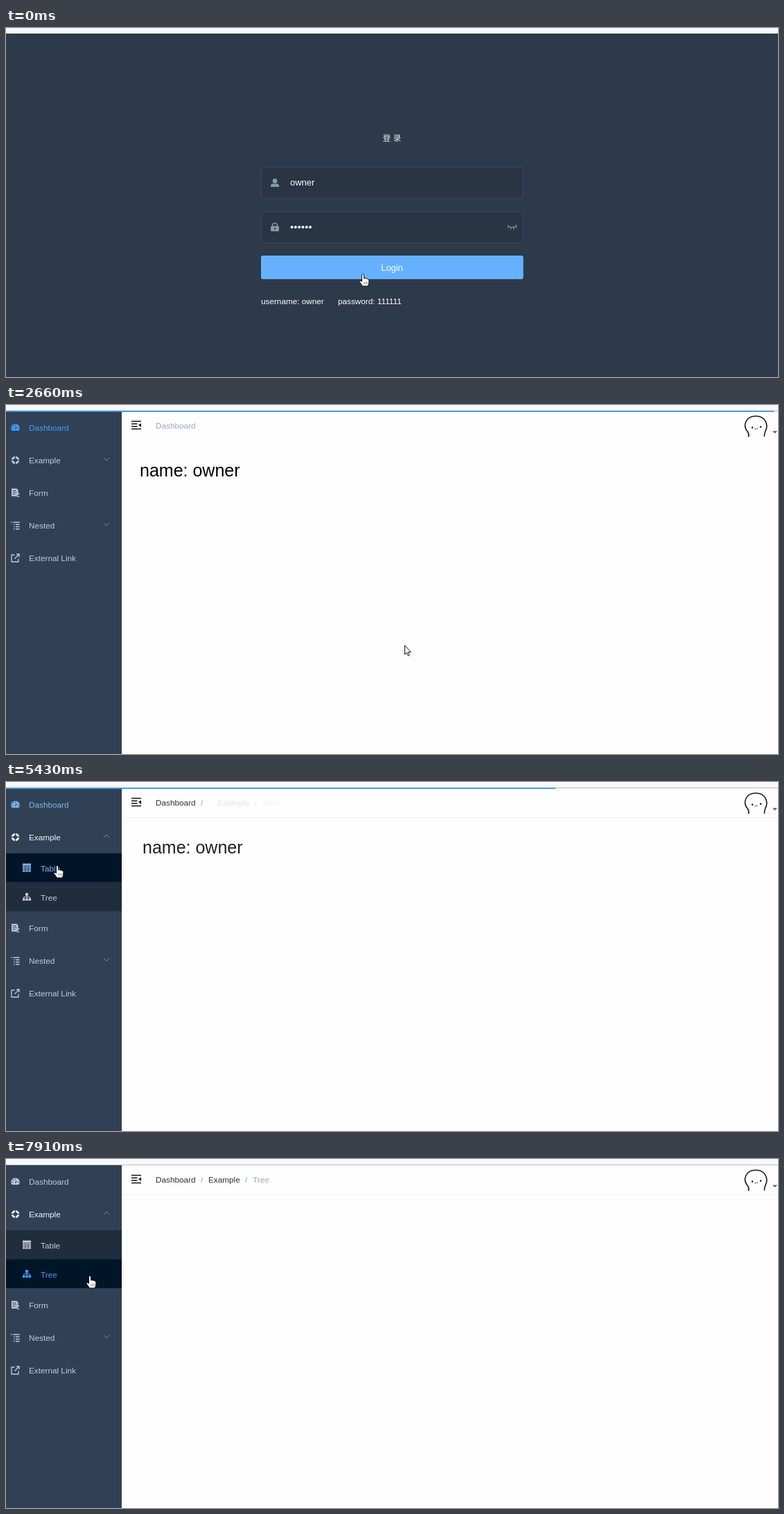
These frames come from a looping animation (1114 px wide and 503 px high, 8000 ms). An HTML page:

```html
<!DOCTYPE html>
<html lang="zh">
<head>
<meta charset="utf-8">
<title>Control panel demo</title>
<style>
html, body { margin: 0; width: 100%; height: 100%; overflow: hidden; background: #fefefe; }
svg { display: block; }
text { font: 11.75px "Liberation Sans", Arial, sans-serif; white-space: pre; }
</style>
</head>
<body>
<svg id="stage" width="100%" height="100%" viewBox="0 0 1114 503"></svg>
<script>
const stage = document.getElementById('stage');
const LOOP = 8000, USER = 'owner', AUTHOR = 'demo-editor';
const BLUE = '#409eff', MENU = '#bfcbd9', CRUMB = '#97a8be';

// Screen updates: [first, last, count]
const times = [[0, 0, 1], [280, 280, 1], [710, 860, 2], [1420, 1960, 5], [2510, 2660, 2],
  [2780, 3470, 6], [3590, 4460, 7], [4770, 4770, 1], [4890, 5430, 4], [5580, 5700, 2],
  [5820, 6750, 8], [7610, 7910, 3]]
  .flatMap(([a, b, n]) => Array.from({ length: n }, (_, i) => n > 1 ? a + (b - a) * i / (n - 1) : a));

// Pointer hot spot: [time, x, y]
const route = [[0, 515, 354], [280, 514, 353], [560, 514, 353], [860, 238, 252], [1285, 238, 252],
  [1960, 577, 346], [2510, 577, 346], [2660, 575, 346], [3470, 838, 134], [4460, 101, 80],
  [4890, 101, 80], [5250, 74, 120], [6600, 74, 120], [6750, 68, 162], [7460, 68, 162], [7910, 121, 168]];

const clamp = v => Math.max(0, Math.min(1, v));
const ease = v => (v = clamp(v), v * v * (3 - 2 * v));
const mix = (a, b, p) => '#' + [1, 3, 5].map(i => {
  const u = parseInt(a.substr(i, 2), 16), v = parseInt(b.substr(i, 2), 16);
  return Math.round(u + (v - u) * p).toString(16).padStart(2, '0');
}).join('');

const rect = (x, y, w, h, fill, more = '') =>
  `<rect x="${x}" y="${y}" width="${w}" height="${h}" fill="${fill}" ${more}/>`;
const line = (d, color, w = 1, more = '') =>
  `<path d="${d}" fill="none" stroke="${color}" stroke-width="${w}" ${more}/>`;
const shape = (d, fill, more = '') => `<path d="${d}" fill="${fill}" ${more}/>`;
const disc = (x, y, r, fill) => `<circle cx="${x}" cy="${y}" r="${r}" fill="${fill}"/>`;
const text = (s, x, y, fill, style = '', anchor = 'start') =>
  `<text x="${x}" y="${y}" fill="${fill}" text-anchor="${anchor}" style="${style}">${s}</text>`;
const mid = (s, x, y, fill, style) => text(s, x, y, fill, style, 'middle');
const group = (body, x, y = 0, opacity = 1, turn = 0) =>
  `<g transform="translate(${x} ${y}) rotate(${turn})" opacity="${opacity}">${body}</g>`;

// Menu icons, centred on 0,0; c is the colour, b the background
const icons = {
  gauge: (c, b) => shape('M-5 4.5A6.2 6.2 0 1 1 5 4.5Z', c) + line('M0 2.5L1.5-1.5', b, 1.2) +
    [[-4, 1], [-2.8, -2], [0, -3.3], [4, 1]].map(([x, y]) => disc(x, y, .8, b)).join(''),
  ring: (c, b) => `<circle r="4.3" fill="none" stroke="${c}" stroke-width="3"/>` +
    line('M0-6.5V-2.5M0 2.5V6.5M-6.5 0H-2.5M2.5 0H6.5', b, 1.3),
  form: (c, b) => shape('M-5.5-6H2L4-4V1L0 5H-5.5Z', c) +
    line('M-4-3H1.5M-4-.5H2M-4 2H0', b) + line('M1 5.5L5.5 .5M3 5.5H5.5', c, 1.3),
  nested: c => line('M-6-4.5H-4.5M-3-4.5H6M-2.5-1.2H-1M.5-1.2H6M-2.5 2H-1M.5 2H6M-2.5 5.2H-1M.5 5.2H6', c, 1.4),
  link: c => line('M-1-4.5H-5.5V5.5H4.5V1M1.5-5.5H5.5V-1.5M5.5-5.5L-1 1', c, 1.3),
  table: (c, b) => rect(-6, -6, 12, 12, c) + line('M-6-2.5H6M-6 .5H6M-6 3.3H6M-2-2.5V6M2-2.5V6', b, .7),
  tree: c => rect(-2, -5.5, 4, 4, c) + [-6, -1.7, 2.6].map(x => rect(x, 2, 3.5, 3.5, c)).join('') +
    line('M0-2V2M-4.3 2V.2H4.3V2', c)
};

function pointer(T) {
  const i = route.findIndex(k => k[0] > T);
  if (i < 0) return route[route.length - 1].slice(1);
  const [a, x, y] = route[i - 1], [b, u, v] = route[i], p = (T - a) / (b - a);
  return [x + (u - x) * p, y + (v - y) * p];
}

function drawPointer(x, y, hand) {
  const d = hand
    ? 'M-1.5 1.5Q0-.8 1.5 1.5V7Q3 5.5 4.3 7.2Q6 6.2 6.9 8Q8.5 7.5 8.8 9.5V13Q8.5 15 7.3 18H-.5Q-2.5 15-5 11.5Q-4.5 9-1.5 11.5Z'
    : 'M.5 .5V13.5L3.3 10.9 5.4 15.5 7.3 14.6 5.2 10.2H9.3Z';
  return group(shape(d, '#fff', 'stroke="#111"') +
    (hand ? line('M2 11.5V15M4.2 11.5V15M6.3 11.5V15', '#555', .7) : ''), x, y);
}

function login(T, hover) {
  const gray = '#889aa4', busy = T >= 2510;
  const field = y => rect(368.5, y, 377.5, 45, '#293444', 'rx="4" stroke="#3c4858"');
  const spoke = line('M3 0H5.5', '#e6f1fd', 1.2);
  const spinner = Array.from({ length: 8 }, (_, i) => group(spoke, 0, 0, 1, i * 45)).join('') +
    '<circle r="3" fill="none" stroke="#e6f1fd"/>';
  return rect(0, 8, 1114, 495, '#2d3a4b') +
    mid('登 录', 557, 163, '#eee', 'font:bold 23px "Noto Sans CJK SC","Noto Sans CJK",sans-serif') +
    field(201) + field(265) +
    disc(388, 220.5, 3.4, gray) + shape('M382 229V227.5Q382 224.5 385 224.5H391Q394 224.5 394 227.5V229Z', gray) +
    text(USER, 410, 227, '#fff', 'font-size:13px') +
    rect(382, 285.5, 12, 7.5, gray, 'rx="1.5"') + line('M384.5 286V284.5A3.5 3.2 0 0 1 391.5 284.5V286', gray, 1.6) +
    rect(387.3, 287.5, 1.4, 3, '#293444') +
    line('M412.5 287H439.5', '#fff', 4, 'stroke-linecap="round" stroke-dasharray="0 5.3"') +
    line('M724 284Q730 291 737 284M725.5 286L724 288.5M728.5 287.5L728 290.5M732.5 287.5L733 290.5M735.5 286L737 288.5', gray, 1.1) +
    rect(368, 328, 378.5, 34, busy ? '#80b4ee' : hover ? '#66b1ff' : BLUE, 'rx="3"') +
    (busy ? group(spinner, 539, 345) : '') +
    mid('Login', busy ? 565 : 557, 349.5, '#fff', 'font-size:12.8px') +
    text('username: ' + USER, 368, 398, '#fff') + text('password: 111111', 479, 398, '#fff');
}

function sidebar(T) {
  const open = 84 * clamp((T - 4710) / 120), turn = 180 * clamp((T - 4680) / 120);
  const toTable = T < 5430 ? 0 : T < 5580 ? .5 : 1, onTree = T >= 7610;
  const hoverTable = T < 5250 || onTree ? 0 : T < 6750 ? 1 : .35;
  const hoverTree = T < 6750 ? 0 : onTree ? 1 : .8;
  const base = '#304156', sub = '#1f2d3d', dark = '#001528';
  const item = (name, icon, y, color, bg) =>
    group(icons[icon](color, bg), 13.5, y) + text(name, 33, y + 4.5, color);
  const subItem = (name, icon, y, color, bg) => rect(0, y, 167, 42, bg) +
    group(icons[icon](color, bg), 30, y + 21) + text(name, 50, y + 26, color);
  const chevron = (y, a) => group(line('M-4-2L0 2L4-2', '#7f8b99'), 145, y, 1, a);
  const over = T >= 4770 && T < 5250;
  return rect(0, 9, 167, 494, base) + (over ? rect(0, 55.5, 167, 47, '#263445') : '') +
    item('Dashboard', 'gauge', 32.5, mix(BLUE, MENU, toTable), base) +
    item('Example', 'ring', 79.5, T < 5430 ? MENU : '#f4f4f5', over ? '#263445' : base) + chevron(78, turn) +
    `<svg x="0" y="102.5" width="167" height="${open}">` +
    subItem('Table', 'table', 0, onTree ? MENU : mix(MENU, BLUE, toTable), mix(sub, dark, hoverTable)) +
    subItem('Tree', 'tree', 42, onTree ? BLUE : MENU, mix(sub, dark, hoverTree)) + '</svg>' +
    group(item('Form', 'form', 126.5, MENU, base) + item('Nested', 'nested', 173.5, MENU, base) +
      chevron(172, 0) + item('External Link', 'link', 220.5, MENU, base), 0, open);
}

function navbar(T) {
  const ink = '#303133', slash = x => text('/', x, 33.5, '#a0a6b2');
  const crumb = (body, start, length) => {
    const e = ease((T - start) / length);
    return group(body, 16 * (1 - e), 0, e);
  };
  let path = text('Dashboard', 216, 33.5, T < 5430 ? CRUMB : ink);
  if (T >= 5430) {
    path += slash(281) + crumb(text('Example', 292, 33.5, ink) + slash(345), 5315, 500) +
      (T < 7610 ? crumb(text('Table', 356, 33.5, CRUMB), 5315, 500)
        : crumb(text('Tree', 356, 33.5, CRUMB), 7540, 350));
  }
  return (T >= 2780 ? rect(167, 51, 947, 1, '#f0f0f2') : '') +
    line('M181 23.5H195M181 27.2H189.5M181 30.8H189.5M181 34.5H195', '#111', 1.5) +
    shape('M195 26.2V31.8L191 29Z', '#111') + path +
    line('M1071.5 46Q1072.5 42 1070.5 39C1062 29 1068 16 1082 16C1096 16 1101 29 1095.5 38.5Q1094 42 1094.5 45.5', '#1a1a1a', 1.6) +
    disc(1077, 32.5, 1.2, '#111') + disc(1089, 31.5, 1.2, '#111') +
    disc(1081.3, 34.5, .8, '#111') + disc(1084, 34.3, .8, '#111') +
    shape('M1106 37.5H1113L1109.5 41Z', '#5a5e66');
}

function grid() {
  const edges = [184.5, 264, 577, 669.5, 762, 854.5, 1106];
  const cx = i => (edges[i] + edges[i + 1]) / 2;
  const tags = [['published', 61, '#f0f9eb', '#c8e9b8', '#67c23a'],
    ['deleted', 51, '#fef0f0', '#fbc9c9', '#f56c6c'], ['draft', 39, '#ecf5ff', '#b3d8ff', BLUE]];
  const head = ['ID', 'Title', 'Author', 'Pageviews', 'Status', 'Display_time'].map((s, i) =>
    text(s, i === 1 ? 273.5 : cx(i), 91.5, '#909399', 'font-weight:bold', i === 1 ? 'start' : 'middle')).join('');
  const rows = tags.map(([tag, w, fill, edge, ink], i) => {
    const y = 131.5 + 48 * i, gray = '#606266';
    return mid(i + 1, cx(0), y + 4, gray) + text('test' + (i + 1), 273, y + 4, gray) +
      mid(AUTHOR, cx(2), y + 4, gray) + mid('3474', cx(3), y + 4, gray) +
      rect(cx(4) - w / 2, y - 13, w, 26, fill, `rx="3" stroke="${edge}"`) +
      mid(tag, cx(4), y + 3.5, ink, 'font-size:10.05px') +
      `<circle cx="892.3" cy="${y - .5}" r="4.8" fill="none" stroke="${gray}"/>` +
      line(`M892.3 ${y - 3.5}v3.5h2.7`, gray) +
      text(`2019-08-19 21:00:${[39, 48, 49][i]} +0800 CST`, 901.5, y + 4, gray);
  }).join('');
  const rules = [67.5, 107.5, 155.5, 203.5, 251.5].map(y => `M184 ${y}H1106.5`).join('') +
    edges.map(x => `M${Math.floor(x) + .5} 67V252`).join('');
  return line(rules, '#e9ecf2') + head + rows;
}

function content(T) {
  if (T < 5815) {
    const e = ease((T - 5315) / 500);
    return group(text('name: ' + USER, 193, 103, '#000', 'font-size:25px'), 30 * e, 0, 1 - e);
  }
  const enter = ease((T - 5815) / 500), leave = ease((T - 7540) / 350);
  return leave < 1 ? group(grid(), 30 * (enter - 1 + leave), 0, enter * (1 - leave)) : '';
}

// Page-load bar: [start, first width]
function progress(T) {
  return [[2660, 1108], [5430, 793], [7610, 793]].map(([start, w]) => {
    const age = T - start, alpha = clamp(1 - (age - 120) / 180);
    return age < 0 || !alpha ? '' : rect(0, 8, age ? 1114 : w, 2, '#4a9ad4', `opacity="${alpha}"`);
  }).join('');
}

function draw(T) {
  const [x, y] = pointer(T), inside = T >= 2660;
  const hand = inside ? x < 167 : x > 368 && x < 746 && y > 328 && y < 362;
  const page = inside
    ? rect(0, 8, 1114, 495, '#fefefe') + content(T) + navbar(T) + sidebar(T) + rect(0, 8, 1114, 1, '#bcbcc0') + progress(T)
    : login(T, hand);
  stage.innerHTML = rect(0, 0, 1114, 8, '#f9f9fd') + page + drawPointer(x, y, hand);
}

let shown = -1;
function tick(now) {
  const t = now % LOOP, T = times.filter(s => s <= t).pop();
  if (T !== shown) draw(shown = T);
  requestAnimationFrame(tick);
}
draw(0);
requestAnimationFrame(tick);
</script>
</body>
</html>
```
